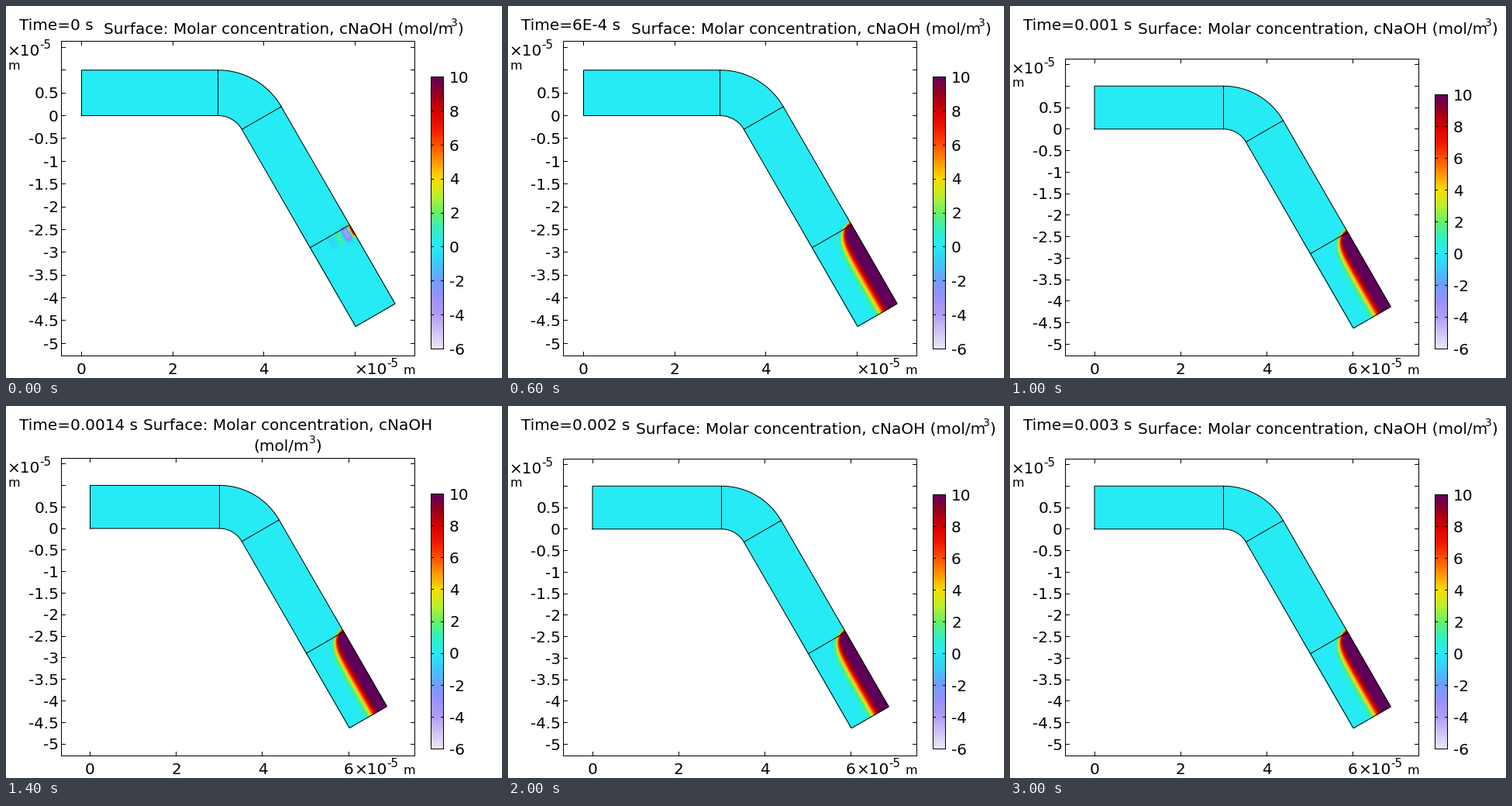
A matplotlib script that plays this animation: 640x480 px, repeating every 3.1 s.

```python
import math
import numpy as np
import matplotlib.pyplot as plt
from matplotlib.animation import FuncAnimation
from matplotlib.colors import LinearSegmentedColormap, Normalize

W, H, DPI = 640, 480, 80
FRAMES, STEP_MS = 31, 100
PT = 72 / DPI  # points per pixel

plt.rcParams["font.family"] = "DejaVu Sans"
fig = plt.figure(figsize=(W / DPI, H / DPI), dpi=DPI, facecolor="white")
ax = fig.add_axes([0, 0, 1, 1])

LEFT, RIGHT, BOTTOM = 71.5, 527.5, 451.5
BAR_L, BAR_R, BAR_B = 548.5, 564.5, 442.5
C_MIN, C_MAX = -6, 10

# Colour stops: concentration and RGB
STOPS = [
    (-6, 236, 230, 247), (-5, 207, 194, 247), (-4, 178, 156, 248),
    (-3, 152, 145, 253), (-2, 112, 158, 255), (-1, 62, 200, 252),
    (0, 38, 235, 245), (1, 50, 240, 192), (2, 105, 240, 102),
    (3, 190, 240, 42), (4, 250, 220, 0), (5, 255, 150, 0),
    (6, 255, 80, 0), (7, 240, 22, 0), (8, 212, 0, 0),
    (9, 150, 0, 32), (10, 95, 0, 90),
]
CMAP = LinearSegmentedColormap.from_list(
    "molar",
    [((c - C_MIN) / (C_MAX - C_MIN), (r / 255, g / 255, b / 255))
     for c, r, g, b in STOPS], N=512)
NORM = Normalize(C_MIN, C_MAX, clip=True)

# Channel: straight part, 60 degree bend, two straight parts
BEND = np.radians(60)
ALONG = np.array([np.cos(BEND), -np.sin(BEND)])
INWARD = np.array([-np.sin(BEND), -np.cos(BEND)])
CENTER = np.array([3, -0.6])
R_IN, R_OUT = 0.6, 1.6


def arc(radius):
    a = np.linspace(0, BEND, 40)
    return CENTER + radius * np.column_stack([np.sin(a), np.cos(a)])


OUTER, INNER = arc(R_OUT), arc(R_IN)
JOINT_OUT = OUTER[-1] + 3 * ALONG
OUTLINE = np.vstack([[(0, 0), (0, 1)], OUTER, [OUTER[-1] + 5 * ALONG],
                     [INNER[-1] + 5 * ALONG], INNER[::-1]])
SEAMS = [np.array([OUTER[0], INNER[0]]),
         np.array([OUTER[-1], INNER[-1]]),
         np.array([JOINT_OUT, JOINT_OUT + INWARD])]

# s runs downstream from the last seam, n runs inward from the outer wall
S, N = np.meshgrid(np.linspace(-0.4, 2, 200), np.linspace(0, 1, 100))
MESH = JOINT_OUT + S[..., None] * ALONG + N[..., None] * INWARD


def step(x):
    return 1 / (1 + np.exp(-np.clip(x, -50, 50)))


def diffuse(x):
    """Smooth step with a Gaussian tail."""
    return 0.5 * (1 + np.vectorize(math.erf)(x / math.sqrt(2)))


def steady_plume():
    up = np.maximum(S + 0.1, 0)
    width = 0.05 + 0.05 * np.tanh(up / 0.6)
    edge = 0.43 * np.tanh((up / 0.25) ** 0.7) - 0.3 * width
    return 10.5 * diffuse((edge - N) / width) * step((S + 0.065) / 0.03)


PLUME = steady_plume()


def concentration(t):
    if t == 0:
        window = step((S - 0.01) / 0.025) * step((0.29 - S) / 0.03)
        ripple = np.cos(np.pi * N / 0.18) * np.exp(-N / 0.18)
        return 11 * window * ripple
    front = (0.527 + 0.62 * N) * t
    return PLUME * step((front - S) / (0.33 * np.sqrt(t / 3)))


def layout(i):
    """Frame top, origin, scale, colour bar top."""
    if i < 10:
        return 45.5, (97.5, 141.5), 58.75, 91.5
    if i % 10 == 0:
        return 68.5, (109, 158.8), 55.5, 114.5
    return 67.5, (108.5, 158), 55.6, 113.5


def text(x, y, s, size=20, ha="left"):
    ax.text(x, y, s, fontsize=size * PT, ha=ha, va="baseline", color="black")


def line(xs, ys):
    ax.plot(xs, ys, color="black", lw=PT, snap=False,
            solid_capstyle="projecting", solid_joinstyle="miter")


def mid(v):
    """Centre of the pixel that holds v."""
    return np.floor(v) + 0.5


def box(x0, y0, x1, y1):
    line([x0, x1, x1, x0, x0], [y0, y0, y1, y1, y0])


def power(x, y):
    text(x, y, "×10")
    text(x + 42.5, y - 9, "-5", 15)


def unit(x, y, width):
    """Superscript and closing bracket after text of the given width."""
    text(x + width, y - 9, "3", 14)
    text(x + width + 8.6, y, ")")


def draw_title(i):
    value = "0" if i == 0 else f"{i}E-4" if i < 10 else f"{i / 10000:g}"
    text(17, 31, f"Time={value} s")
    name = "Surface: Molar concentration, cNaOH"
    if i > 10 and i % 10:
        text(177, 31, name)
        text(319.5, 57, "(mol/m")
        unit(319.5, 57, 71.3)
    else:
        x = 126 if i == 0 else 159 if i < 10 else 165
        text(x, 35, name + " (mol/m")
        unit(x, 35, 448)


def draw_axes(i, top, origin, k):
    box(LEFT, top, RIGHT, BOTTOM)
    for v in (0, 2, 4, 6):
        x = origin[0] + k * v
        line([mid(x)] * 2, [BOTTOM, BOTTOM - 5])
        line([mid(x)] * 2, [top, top + 5])
        if v < 6 or i >= 10:
            text(x, 475, str(v), ha="center")
    for v in np.arange(-5, 2, 0.5):
        y = origin[1] - k * v
        line([LEFT, LEFT + 5], [mid(y)] * 2)
        line([RIGHT, RIGHT - 5], [mid(y)] * 2)
        if v < 1:
            text(68, y + 7.3, f"{v:g}", ha="right")
    power(1, top + 18.6)
    text(2, top + 36, "m", 16)
    power(449, 475)
    text(512.5, 475, "m", 16)


def draw_bar(top):
    ramp = np.linspace(C_MAX, C_MIN, 400)[:, None]
    ax.imshow(ramp, cmap=CMAP, norm=NORM, aspect="auto",
              extent=(BAR_L, BAR_R, BAR_B, top))
    box(BAR_L, top, BAR_R, BAR_B)
    for v in range(C_MIN, C_MAX + 1, 2):
        y = BAR_B - (v - C_MIN) * (BAR_B - top) / (C_MAX - C_MIN)
        line([BAR_L, BAR_L + 3], [mid(y)] * 2)
        line([BAR_R, BAR_R - 3], [mid(y)] * 2)
        text(572, y + 7.3, str(v))


def draw_channel(i, origin, k):
    def place(p):
        return origin[0] + k * p[..., 0], origin[1] - k * p[..., 1]

    ax.fill(*place(OUTLINE), color=CMAP(NORM(0)), lw=0)
    ax.pcolormesh(*place(MESH), concentration(i), cmap=CMAP, norm=NORM,
                  shading="gouraud")
    line(*place(np.vstack([OUTLINE, OUTLINE[:1]])))
    for seam in SEAMS:
        xs, ys = place(seam)
        line(mid(xs), ys)


def draw(i):
    ax.clear()
    top, origin, k, bar_top = layout(i)
    draw_channel(i, origin, k)
    draw_bar(bar_top)
    draw_axes(i, top, origin, k)
    draw_title(i)
    ax.set(xlim=(0, W), ylim=(H, 0), aspect="auto")
    ax.axis("off")
    return []


anim = FuncAnimation(fig, draw, frames=FRAMES, interval=STEP_MS,
                     init_func=lambda: [], repeat=True, repeat_delay=0)

plt.show()
```
